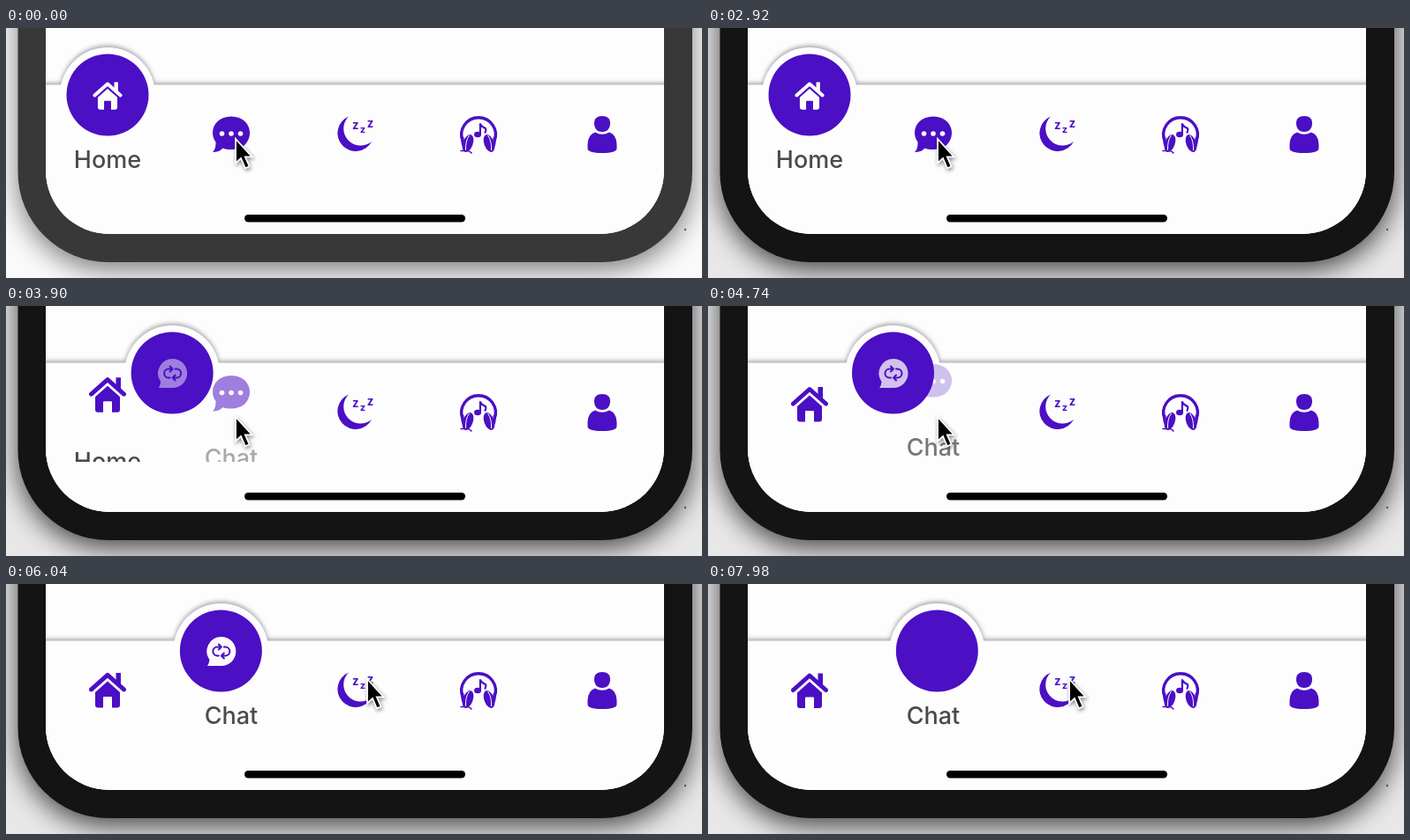
Write an HTML page that moves like this. It is 788 by 284 pixels and loops after 8000 ms.

```html
<!DOCTYPE html>
<html lang="en">
<head>
<meta charset="utf-8">
<title>Tab bar</title>
<style>
  html, body { margin: 0; width: 100%; height: 100%; overflow: hidden; }
  svg { display: block; width: 788px; height: 284px; color: #4b0fc4; }
  #bar { filter: drop-shadow(0 -2px 2.5px rgba(70, 70, 90, .5)); }
  #cursor { filter: drop-shadow(1px 2px 2px rgba(0, 0, 0, .45)); }
  .ink { fill: currentColor; }
  .line { fill: none; stroke: currentColor; stroke-linecap: round; stroke-linejoin: round; }
  .paper { fill: #fdfdfd; }
  .label { font: 500 27px Inter, "Open Sans", sans-serif; fill: #4a4a4a; text-anchor: middle; }
  .zzz { font: 700 13px Inter, sans-serif; fill: currentColor; text-anchor: middle; }
</style>
</head>
<body>
<svg viewBox="0 0 788 284">
  <defs>
    <clipPath id="screen"><rect x="45" y="-200" width="700" height="434" rx="72"/></clipPath>
    <clipPath id="labels"><rect x="45" y="60" width="700" height="117"/></clipPath>
    <g id="house">
      <path class="line" stroke-width="5" d="M-18.5 0 L0 -16.5 L18.5 0"/>
      <path class="ink" d="M9.5 -19 H15 V-5 L9.5 -10Z"/>
      <path class="ink" d="M-14 3 L0 -9.5 L14 3 V17.5 Q14 20.5 11 20.5 H5 V9 Q5 8 4 8 H-4 Q-5 8 -5 9 V20.5 H-11 Q-14 20.5 -14 17.5Z"/>
    </g>
  </defs>

  <rect id="page" width="788" height="284"/>
  <rect id="bezel" x="13.5" y="-300" width="763.5" height="566" rx="102"/>
  <circle cx="769" cy="229" r="1.2" fill="#555"/>

  <g clip-path="url(#screen)">
    <rect class="paper" x="45" width="700" height="234"/>
    <g id="bar" class="paper">
      <rect x="35" y="64.5" width="720" height="200"/>
      <circle id="notch" cy="76" r="54"/>
    </g>

    <use id="homeIcon" href="#house"/>

    <g id="chatIcon">
      <path class="ink" d="M0 -20.5 C13 -20.5 21 -12 21 -2 C21 9 13 17 0 17 C-4 17 -7 16.5 -9.5 15.5 C-12 18.5 -16 20 -21 20 C-18 17 -17.5 13.5 -17.5 8.5 C-20 5 -21 2 -21 -2 C-21 -12 -13 -20.5 0 -20.5Z"/>
      <g class="paper"><circle cx="-10.5" cy="-1" r="2.8"/><circle cy="-1" r="2.8"/><circle cx="10.5" cy="-1" r="2.8"/></g>
    </g>

    <path class="ink" d="M388 100.5 A20.5 20.5 0 1 0 414 129 A19.3 19.3 0 0 1 388 100.5Z"/>
    <g class="zzz">
      <text x="395.8" y="114.5">z</text>
      <text x="404" y="119" style="font-size:11px">z</text>
      <text x="412.5" y="113">z</text>
    </g>

    <g transform="translate(535 121)">
      <path class="line" stroke-width="3.4" d="M-18 7 A19.3 19.3 0 1 1 18 7"/>
      <g id="cup">
        <ellipse class="ink" cx="-12" cy="10" rx="5.6" ry="10.5" transform="rotate(20 -12 10)"/>
        <path class="line" stroke-width="3" d="M-18 4 Q-19 10 -16 15"/>
        <path fill="none" stroke="#fdfdfd" stroke-width="1" d="M-10.5 1 Q-15 7 -14.5 18"/>
      </g>
      <use href="#cup" transform="scale(-1 1)"/>
      <path class="line" stroke-width="1.6" d="M-20 18.5 H-13 Q-10 18.5 -8 21"/>
      <ellipse class="ink" cx="-1" cy="0" rx="4" ry="3.3"/>
      <path class="line" stroke-width="2.2" d="M1.9 -.5 V-12 Q4 -8 8 -7 Q9 -4.5 7.5 -2.5"/>
    </g>

    <path class="ink" d="M675 100 C681 100 684 103 684 108 C684 114 681 118 675 118 C669 118 666 114 666 108 C666 103 669 100 675 100Z"/>
    <path class="ink" d="M667 118.5 Q675 123 683 118.5 Q691 121 691.5 132 V137 Q691 142 675 142 Q659 142 658.5 137 V132 Q659 121 667 118.5Z"/>

    <g clip-path="url(#labels)">
      <text id="homeLabel" class="label" x="115" y="158.5">Home</text>
      <text id="chatLabel" class="label" x="255" y="158.5">Chat</text>
    </g>

    <g id="disc">
      <circle class="ink" cy="76" r="46.5"/>
      <use id="homeGlyph" color="#fdfdfd" href="#house" transform="translate(0 76.5) scale(.79)"/>
      <g id="chatGlyph" transform="translate(.5 76.5)">
        <path class="paper" d="M0 -16.5 A16.5 16.5 0 1 1 0 16.5 H-16 Q-14 14.5 -13.5 9.5 A16.5 16.5 0 0 1 0 -16.5Z"/>
        <g id="arrow" class="line" stroke-width="2">
          <path d="M-3 5 H-4.5 A5 5 0 0 1 -4.5 -5 H-.5 M-3 -8 L0 -5 L-3 -2"/>
        </g>
        <use href="#arrow" transform="rotate(180)"/>
      </g>
    </g>

    <rect x="270" y="212" width="250" height="8.5" rx="4.2"/>
  </g>

  <path id="cursor" stroke="#fff" stroke-width="1.8" d="M0 -1 V26.5 L6 21 L10.8 32.3 L15.6 30.2 L10.8 19.3 H18.6Z"/>
</svg>

<script>
  const LOOP = 8000, HOME_X = 115, TAB_GAP = 140;
  const CHAT_START = 63, MOON_START = 171.64, SLIDE = 78;
  const el = {};
  document.querySelectorAll("[id]").forEach(node => el[node.id] = node);

  const clamp = v => Math.min(1, Math.max(0, v));
  const mix = (a, b, k) => a + (b - a) * k;
  const gray = v => `rgb(${v}, ${v}, ${v})`;
  const place = (node, x, y) => node.setAttribute("transform", `translate(${x} ${y})`);
  const fade = (node, v) => node.setAttribute("opacity", v);

  // Ticks repeat with lengths of 20, 20 and 100 ms.
  function tickAt(ms) {
    const shifted = ms + 20, rest = shifted % 140;
    return 3 * Math.floor(shifted / 140) + (rest < 20 ? 0 : rest < 40 ? 1 : 2);
  }

  const progress = (tick, start) => clamp((tick - start) / SLIDE);
  // A quick departure followed by a steady glide.
  const glide = s => s >= 1 ? 1 : .35 * (1 - Math.exp(-18 * s)) + .65 * s;

  function draw(ms) {
    const tick = tickAt(ms);
    const s = progress(tick, CHAT_START);
    const eased = 1 - (1 - s) ** 2;
    const x = HOME_X + TAB_GAP * (glide(s) + glide(progress(tick, MOON_START)));

    place(el.notch, x, 0);
    place(el.disc, x, 0);
    fade(el.homeGlyph, s > 0 ? 0 : 1);
    fade(el.chatGlyph, tick > MOON_START ? 0 : eased);

    place(el.homeIcon, 115, 120.5 - 38 * (1 - eased));
    fade(el.homeIcon, clamp(3 * eased));
    place(el.chatIcon, 255, 121 - 46 * eased);
    fade(el.chatIcon, 1 - eased);

    place(el.homeLabel, 0, 60 * eased);
    place(el.chatLabel, 0, 44 * (1 - eased));
    fade(el.chatLabel, eased);

    const c = clamp((tick - 104) / 15.3), move = c * c * (3 - 2 * c);
    place(el.cursor, mix(260, 409, move), mix(127, 109, move));

    const tone = ms < 1260 ? 0 : ms < 2700 ? .5 : 1;
    el.page.setAttribute("fill", gray(mix(250, 232, tone)));
    el.bezel.setAttribute("fill", gray(mix(56, 20, tone)));
    el.bezel.style.filter = `drop-shadow(0 9px 15px rgba(0, 0, 0, ${mix(.5, .7, tone)}))`;
  }

  const start = performance.now();
  function loop() {
    draw((performance.now() - start) % LOOP);
    requestAnimationFrame(loop);
  }
  loop();
</script>
</body>
</html>
```
